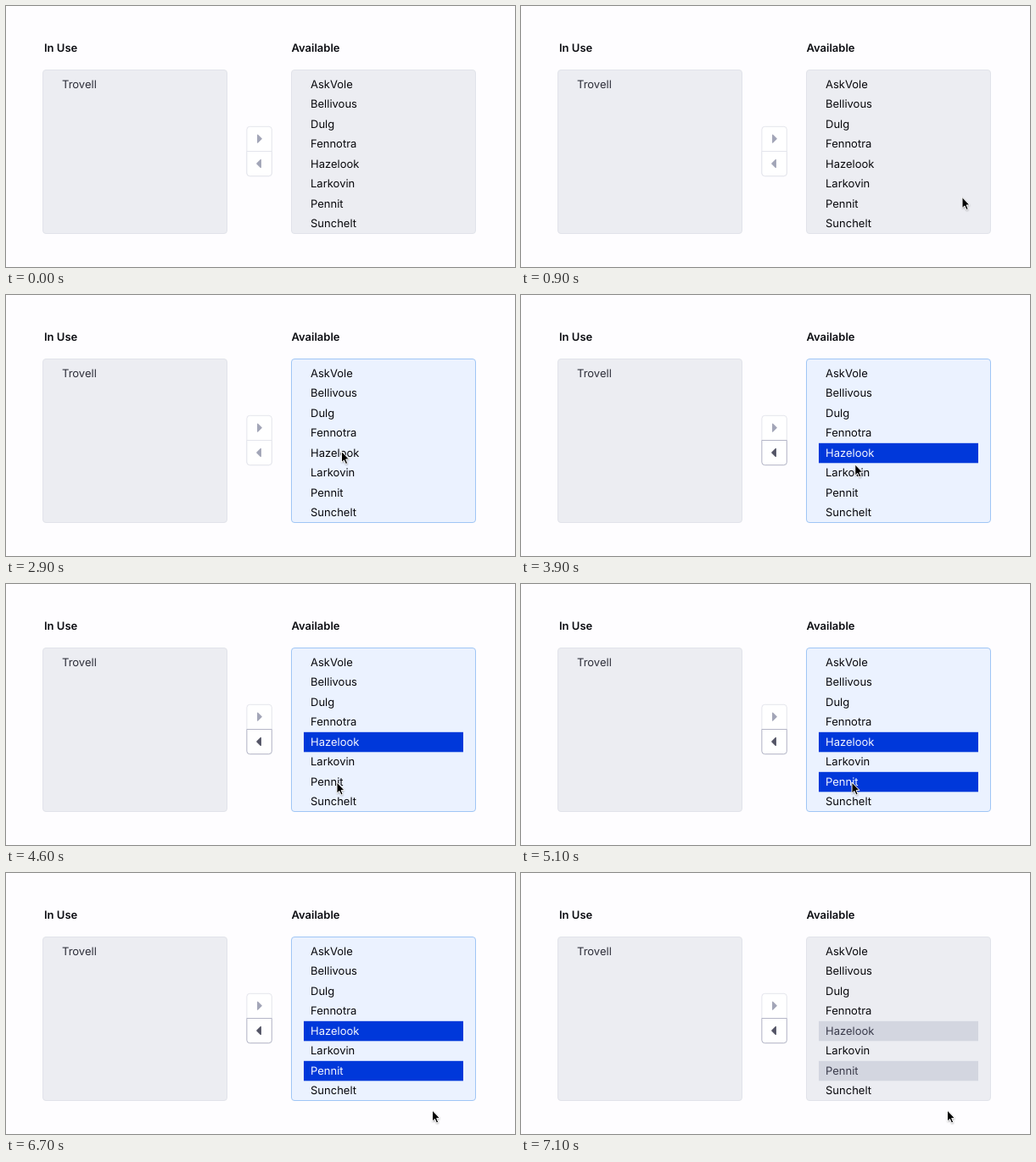
An HTML page for the animation above (8 s loop, 600 px wide and 308 px high).

```html
<!DOCTYPE html>
<html lang="en">
<head>
<meta charset="utf-8">
<title>Dual list picker</title>
<style>
  html, body { margin: 0; width: 100%; height: 100%; overflow: hidden; background: #fefdff; }
  svg { display: block; width: 600px; height: 308px; }
  text { font: 400 13px Inter, "Open Sans", sans-serif; text-rendering: geometricPrecision; }
  .head { font-weight: 600; fill: #0c0d12; }
</style>
</head>
<body>
<svg viewBox="0 0 600 308">
  <defs>
    <filter id="soft" x="-50%" y="-50%" width="200%" height="200%">
      <feGaussianBlur stdDeviation="0.8"/>
    </filter>
    <path id="arrow" d="M0 0V13L3 10.4L5 15L7.2 14.1L5.2 9.4H9Z"/>
    <path id="tri" d="M-2 -4.5V4.5L2.5 0Z" stroke-width="1.2" stroke-linejoin="round"/>
  </defs>

  <text class="head" x="45" y="54.2">In Use</text>
  <text class="head" x="336.5" y="54.2">Available</text>

  <rect x="43.5" y="75.5" width="217" height="193" rx="3.5" fill="#ecedf2" stroke="#e1e3ea"/>
  <text x="66" y="96.8" fill="#2c2d38">Trovell</text>

  <rect id="box" x="336.5" y="75.5" width="217" height="193" rx="3.5"/>
  <g id="rows"></g>

  <rect x="283.9" y="142.3" width="29.4" height="58.4" rx="3.5" fill="#fff" stroke="#e4e5ec"/>
  <path d="M284 171.5H313" stroke="#e4e5ec"/>
  <use href="#tri" x="298.7" y="156.7" fill="#a2a5b7" stroke="#a2a5b7"/>
  <path id="lower" d="M283.9 171.5H313.3V197.2a3.5 3.5 0 0 1 -3.5 3.5H287.4a3.5 3.5 0 0 1 -3.5 -3.5Z" fill="#fff"/>
  <use id="left" href="#tri" transform="translate(298.3 186) scale(-1 1)"/>

  <g id="cursor">
    <use href="#arrow" x="0.3" y="1.2" opacity="0.4" filter="url(#soft)"/>
    <use href="#arrow" fill="#000" stroke="#fff" stroke-linejoin="round"/>
  </g>
</svg>
<script>
const LOOP = 8000, STEP = 100, PITCH = 23.5;
const names = ["AskVole", "Bellivous", "Dulg", "Fennotra", "Hazelook", "Larkovin", "Pennit", "Sunchelt"];
const pickedAt = { Hazelook: 3200, Pennit: 5000 };
const FOCUS = 1100, BLUR = 7100, ENTER = 500;

// The pointer glides to each stop in turn; a higher power brakes harder.
const entry = { x: 553.5, y: 288 };
const stops = [
  { from: ENTER, to: 900, x: 520, y: 225.5, power: 1.6 },
  { from: 2100, to: 2900, x: 395.5, y: 184.5, power: 1.1 },
  { from: 3800, to: 4600, x: 390, y: 234, power: 2.8 },
  { from: 5700, to: 6700, x: 502.5, y: 280, power: 1.1 }
];

const $ = id => document.getElementById(id);
const ramp = (t, a, b) => Math.min(1, Math.max(0, (t - a) / (b - a)));
const blend = (a, b, p) => `color-mix(in srgb, ${b} ${p * 100}%, ${a})`;

function add(parent, tag, attrs) {
  const el = document.createElementNS("http://www.w3.org/2000/svg", tag);
  for (const k in attrs) el.setAttribute(k, attrs[k]);
  return parent.appendChild(el);
}

const rows = names.map((name, i) => {
  const y = 96.8 + i * PITCH;
  const band = add($("rows"), "rect", { x: 351, y: y - 16, width: 188, height: PITCH });
  const label = add($("rows"), "text", { x: 359, y });
  label.textContent = name;
  return { name, band, label };
});

function cursorAt(t) {
  let { x, y } = entry;
  for (const s of stops) {
    const p = 1 - (1 - ramp(t, s.from, s.to)) ** s.power;
    x += (s.x - x) * p;
    y += (s.y - y) * p;
  }
  return `translate(${x} ${y})`;
}

function draw(t) {
  const focus = t < BLUR ? ramp(t, FOCUS, FOCUS + 200) : 0;
  $("box").style.fill = blend("#ecedf2", "#ebf2ff", focus);
  $("box").style.stroke = blend("#e1e3ea", "#a0c6f5", focus);

  for (const { name, band, label } of rows) {
    const on = t >= pickedAt[name];
    band.style.fill = !on ? "none" : focus ? "#0038da" : "#d3d6e0";
    label.style.fill = !on ? "#08080c" : focus ? "#f4f7ff" : "#393a4a";
  }

  const ready = ramp(t, pickedAt.Hazelook - STEP, pickedAt.Hazelook + 2 * STEP);
  $("lower").style.stroke = blend("#e4e5ec", "#b4b6c7", ready);
  $("left").style.fill = $("left").style.stroke = blend("#a2a5b7", "#545566", ready);

  $("cursor").style.visibility = t < ENTER ? "hidden" : "visible";
  $("cursor").setAttribute("transform", cursorAt(t));
}

const start = performance.now();
function tick() {
  const t = (performance.now() - start) % LOOP;
  draw(Math.floor(t / STEP) * STEP);
  requestAnimationFrame(tick);
}
tick();
</script>
</body>
</html>
```
